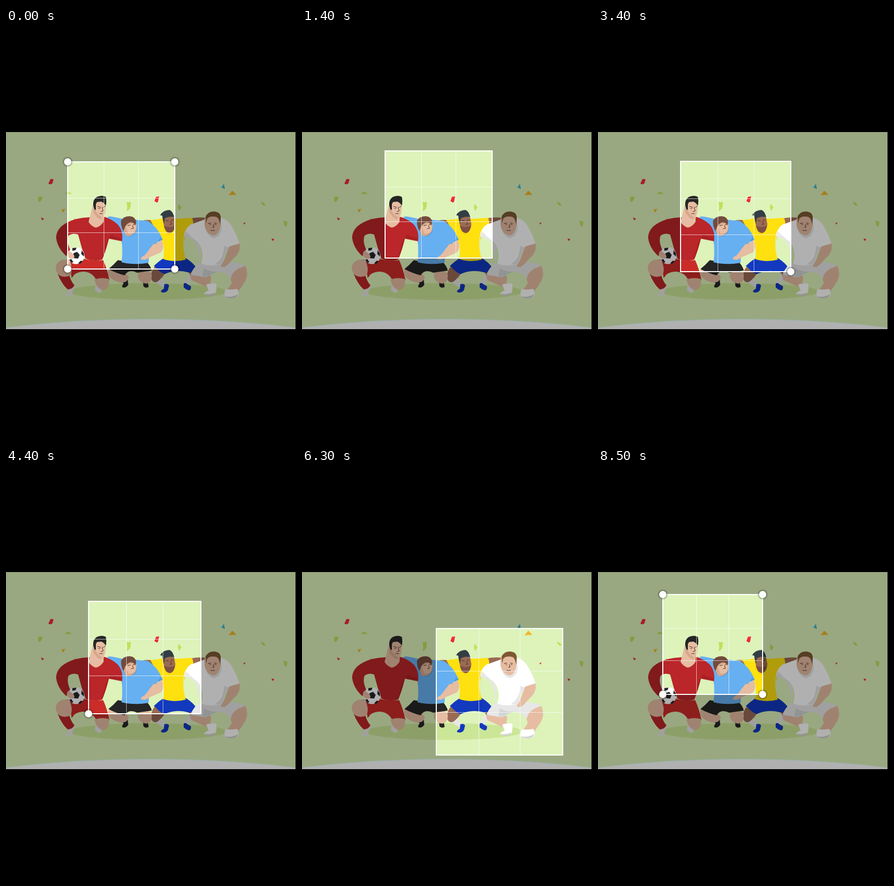
An HTML page without scripts that plays this animation: 555x788 px, repeating every 9.2 s.

```html
<!DOCTYPE html>
<html lang="en">
<head>
<meta charset="utf-8">
<title>Crop tool</title>
<style>
html, body { margin: 0; width: 100%; height: 100%; overflow: hidden; background: #000; }
.photo { position: absolute; left: 0; top: 199px; width: 554px; height: 377px; overflow: hidden; background: #ddf3ba; }
.photo svg { position: absolute; left: 0; top: 0; }

/* The oversized shadow dims everything outside the crop box. */
.crop {
  position: absolute; box-sizing: border-box; aspect-ratio: 1; margin: -1px;
  border: 2px solid #fff; box-shadow: 0 0 0 900px rgba(0, 0, 0, .31);
  animation: crop 9.2s infinite step-end;
}
.crop::before, .crop::after { content: ""; position: absolute; box-sizing: border-box; border: 0 solid rgba(255, 255, 255, .65); }
.crop::before { inset: 0 33.33%; border-width: 0 1px; }
.crop::after { inset: 33.33% 0; border-width: 1px 0; }

.crop i {
  position: absolute; z-index: 1; width: 14px; height: 14px; margin: -8px; border-radius: 50%;
  background: #fff; box-shadow: 0 0 3px 1px rgba(0, 0, 0, .55);
  animation: idle 9.2s infinite step-end;
}
.crop .tl { left: 0; top: 0; }
.crop .tr { right: 0; top: 0; }
.crop .bl { left: 0; bottom: 0; animation-name: drag-bl; }
.crop .br { right: 0; bottom: 0; animation-name: drag-br; }

@keyframes crop {
  0% { left: 118px; top: 57px; width: 207px; }
  7.6% { left: 115px; top: 105px; animation-timing-function: steps(2); }
  9.78% { left: 112px; top: 165px; animation-timing-function: steps(3); }
  13.04% { left: 70px; top: 3px; animation-timing-function: steps(2); }
  15.21% { left: 159px; top: 36px; width: 207px; }
  17.39% { left: 162px; top: 68px; }
  19.56% { left: 158px; top: 56px; width: 207px; }
  26.08% { left: 158px; top: 56px; width: 207px; animation-timing-function: steps(3); }
  29.34% { width: 149px; }
  30.43% { width: 143px; animation-timing-function: steps(4); }
  34.78% { width: 204px; animation-timing-function: steps(3); }
  38.04% { width: 218px; }
  40.21% { left: 158px; width: 217px; }
  47.82% { left: 158px; top: 56px; width: 217px; animation-timing-function: steps(2); }
  50% { left: 226px; width: 149px; }
  52.17% { left: 243px; width: 132px; }
  54.34% { left: 248px; width: 127px; }
  56.52% { left: 222px; width: 153px; animation-timing-function: steps(3); }
  59.78% { left: 130px; top: 56px; width: 244px; }
  63.04% { left: 138px; top: 66px; animation-timing-function: steps(3); }
  66.3% { left: 216px; top: 130px; }
  67.39% { left: 250px; top: 125px; }
  68.47% { left: 257px; top: 108px; }
  69.56% { left: 213px; top: 78px; animation-timing-function: steps(2); }
  71.73% { left: 128px; top: 10px; }
  72.82% { left: 124px; top: 43px; width: 244px; }
  88.04% { left: 124px; top: 43px; width: 244px; animation-timing-function: steps(3); }
  91.3% { width: 195px; }
  92.39%, 100% { left: 124px; top: 43px; width: 193px; }
}
@keyframes idle {
  0%, 19.56%, 40.21%, 59.78%, 72.82%, 80.43%, 92.39%, 100% { visibility: visible; }
  7.6%, 26.08%, 47.82%, 63.04%, 78.26%, 88.04% { visibility: hidden; }
}
@keyframes drag-br {
  0%, 19.56%, 59.78%, 72.82%, 100% { visibility: visible; }
  7.6%, 47.82%, 63.04% { visibility: hidden; }
}
@keyframes drag-bl {
  0%, 19.56%, 40.21%, 72.82%, 80.43%, 92.39%, 100% { visibility: visible; }
  7.6%, 26.08%, 63.04%, 78.26%, 88.04% { visibility: hidden; }
}

.skin { fill: #e6bda2; }
.tan { fill: #d7a78b; }
.brown { fill: #9a6a54; }
.red { fill: #ba262a; }
.red-lit { fill: #cb2c28; }
.red-dark { fill: #a52025; }
.blue { fill: #66b0f1; }
.blue-dark { fill: #559bdc; }
.yellow { fill: #ffe10f; }
.yellow-dark { fill: #eccb08; }
.navy { fill: #1239be; }
.black { fill: #252525; }
.white { fill: #fff; }
.gray { fill: #e7e7e8; }
.gray-dark { fill: #d3d4d6; }
.line { fill: none; stroke: #4a2c24; stroke-width: 1; stroke-linecap: round; }
.lime { fill: #bfe15b; }
.ruby { fill: #f3283a; }
.gold { fill: #f4b62a; }
</style>
</head>
<body>
<div class="photo">
<svg width="554" height="377" viewBox="0 199 554 377">
  <path class="white" stroke="#d0ffe0" d="M-2 573Q130 556.500 277 556.500T556 573V580H-2z"/>
  <ellipse cx="272" cy="504" rx="151" ry="16" fill="#cce697"/>

  <g id="confetti">
    <path class="ruby" d="M85 289l6 0-2 8-3 2-5-1zM67 362l6 3-4 3zM130 365l4 1-2 3zM287 323l6-1-2 10-2 2-5-3zM508 403h5l-2 5z M454 373l4-1-1 4z"/>
    <path class="lime" d="M62 323l8-1-2 7-3 4-4-3zM114 315q5-4 12 2l-11 1zM231 333l8 0-1 11-5 6-2-1 1-6zM330 336l6 7-5 7-2-7zM487 333q6-1 10 6l-4 1zM531 368l8 3-3 10-3-3z"/>
    <path class="gold" d="M106 347l8-1-5 7zM433 311l8 8-15 1z"/>
    <path fill="#40b9d3" d="M417 298l2 10-7-3z"/>
  </g>

  <g id="yellow-player">
    <path class="brown" d="M256 370q12-5 25-2v18q-11-11-25-12zM354 364q14-3 31-1v12l-27 7z"/>
    <path class="brown" d="M347 462l9 17q14 1 13-12l-6-10z"/>
    <path class="gray" d="M284 483l12-7q3 8 12 15l-5 6q-10-5-19-14zM341 487l9-15q5 2 5 8l-6 11z"/>
    <path class="navy" d="M303 490q8-2 9 3l-2 8q-4 7-13 4-2-3 5-6zM340 489q4-3 7 1l7 4q1 5-3 8-6-1-11-6z"/>
    <path class="navy" d="M302 440h42q13 8 20 18-5 9-13 10-26-8-48 3-13-6-20-16 8-8 19-15z"/>
    <path class="brown" d="M285 456q-9 10-7 24 4 9 12 5 9-7 13-14-11-5-18-15z"/>
    <path class="yellow" d="M276 367q11 0 25-3l25 1 30-2q4 10 1 14-16 9-17 24-3 18 4 42-22 6-43-1 4-32-7-45-8-12-18-30z"/>
    <path class="yellow-dark" d="M301 368q-1 19 7 25 13 3 18-26-3 24-14 28-10-3-11-27zM357 377q-14 7-15 32-3-23 15-32z"/>
    <path class="brown" d="M300 362q9-6 22 1l2 12q-1 16-11 17-8 0-10-12z"/>
    <path fill="#7d5144" d="M302 377q10 7 21 1-2 14-10 14-8-1-11-15z"/>
    <path fill="#333d43" d="M295 358q6-10 18-10 6 2 9 14-10-3-18 2l-2 11-2-9-1-7z"/>
    <path class="line" d="M306 368l5 1m5-1l4-1m-5 3l2 5-3 1"/>
  </g>

  <g id="blue-player">
    <path class="skin" d="M183 363q10-4 18 0l-5 13-12-3z"/>
    <path class="black" d="M222 483l11-2 1 10q-4 7-11 5-2-3 2-7zM262 482l9 2 2 11q-5 4-10-1z"/>
    <path class="skin" d="M200 460q21-2 35 16-2 11-14 11-20-4-24-14-4-9 3-13zM254 463q18-5 25 9 1 15-11 17-13-2-16-14z"/>
    <path class="black" d="M214 444q29 6 54 2 9 9 11 18l-28 4q-16-8-24 5-16-4-31-12 10-8 18-17z"/>
    <path class="blue" d="M198 360q13 2 25 5 28 2 48 4 19 11 29 36l-20 9q-7 5-7 35-28 5-52-1 3-21 0-42-13-9-26-31-9-3-10-5 6-5 13-10z"/>
    <path class="blue-dark" d="M222 382q3 15 14 17 14-1 16-20-4 16-15 17-9-2-15-14zM275 420q13-2 20-20l5 5-20 9z"/>
    <path class="skin" d="M281 414q10-2 17-9 6 14-1 24l-23 10q-9 7-16 3 0-4 7-7 7-8 16-21z"/>
    <path class="tan" d="M224 374q8-9 24-5 5 16-3 24-7 7-15 4-7-8-6-23z"/>
    <path class="skin" d="M229 379q9-6 19-5 3 11-3 17-6 3-11 2z"/>
    <path fill="#734b3c" d="M220 369q4-9 17-9 11 1 12 11l-1 6q-5-6-11-5-6 2-9 8l-3 8q-5-6-5-19z"/>
    <path class="line" d="M233 378l5-1m5-1l4 0m-5 2l2 5-4 1"/>
  </g>

  <g id="red-player">
    <path class="gray" d="M126 489q6 1 5 6l-6 17q-8 4-11-1l8-10zM171 492l11 3q3 8-1 11-7 1-11-5z"/>
    <path class="red" d="M99 470l21-3q2 15 11 25-3 7-13 8-12-11-19-30z"/>
    <path class="red-lit" d="M141 439q24 8 45 5 8 18 12 38l-24 2q-9-19-28-18-14 1-20 12-4-23-16-34z"/>
    <path class="red-lit" d="M116 445l34-4q-12 5-16 23l-8 14q-4-23-10-33z"/>
    <path class="skin" d="M96 453q9-14 25-9 8 16 3 29-13 6-22 0-9-8-6-20zM169 481q13-5 28-1 2 13-6 20-15 5-22-19z"/>
    <path class="red" d="M160 362q-27 1-43 10-21 11-21 29 2 19 19 35l9-9q-9-20-4-30 8-6 18-2 6 24 14 46 18 7 32 2 8-20 13-40l25 5q3-19-8-32-10-10-27-15z"/>
    <path class="red-dark" d="M184 443q5-32 17-47l21 7v3l-25-4q-7 28-13 41z"/>
    <path class="skin" d="M166 338q10-12 24-4 2 12-1 23-3 6-2 13-5 9-15 12-9-3-14-11z"/>
    <path class="tan" d="M166 349l4-4q2 10 12 16l3 1-4 4q-11-5-15-17z"/>
    <path class="black" d="M167 339q-1-11 7-16 10-4 17 0 2 8 0 17-3-6-9-8l-8 1-2 4 0 11-3-1z"/>
    <path class="line" d="M175 341l6 2m5 0l4-2m-13 4h3m4-2l2 7-4 1m-3 4h6"/>
    <circle class="white" cx="134" cy="435.500" r="16"/>
    <path class="black" d="M129 431l7-3 5 6-3 7-9-1zM127 421l8-1-2 5-6 1zM145 425l4 6v6l-5-5zM138 450l5-5 4 1-5 5zM121 443l4-1 4 6-4 1z"/>
    <path class="skin" d="M119 426q8 3 12 10 0 8-10 4-8-5-2-14z"/>
  </g>

  <g id="white-player">
    <path class="skin" d="M362 458l31 18-2 11 9 4-7 9-38-18q-6-8 7-24zM426 466l32-11q8 18-3 34l-14 20-19-5 10-16z"/>
    <path class="white" d="M383 491q8-4 19-2 2 9-1 19-11 5-22 1 1-4 9-7zM420 500q11 1 23-1 4 10 0 15-12 5-24 1-2-9 1-15z"/>
    <path class="gray-dark" d="M379 508q10 3 22-2-2 7-15 6zM419 513q14 3 25-4-1 8-14 8-9 0-11-4z"/>
    <path class="gray" d="M377 446l52 2q17 0 29 7-15 4-24 14l-4 10q-10-13-27-13-13 1-19 11l-31-5q8-20 24-26z"/>
    <path class="gray-dark" d="M379 459q8 10 42 6-24 0-36 12l-9-3z"/>
    <path class="white" d="M381 366l31-3q14 4 21 18 8 14 14 31-8 4-18 8-12 9-13 31-24 6-42 0 7-27-8-43-10-8-25-9 0-14 12-23 14-5 28-10z"/>
    <path class="gray" d="M341 399q1-5 4-10 7 9 21 19 11 14 2 43 4-24-7-42-8-8-20-10zM429 420q-13 9-13 31-9 2-17 1 19-11 18-36 6 4 12 4z"/>
    <path class="gray" d="M381 374q3 20 15 23 13-3 17-22 1 24-16 27-16-5-16-28z"/>
    <path class="skin" d="M427 418l20-6q2 17-9 26l-16 17q-8 5-11-1 6-6 10-19z"/>
    <path class="skin" d="M380 364q14-9 31 1v13q-4 18-15 19-13-4-16-19z"/>
    <path fill="#7d5832" d="M382 360q6-10 17-9 12 1 12 12l-1 13q-2-11-6-14-13-4-19 3l-2 9z"/>
    <path class="line" d="M387 374l5-1m7 0l4 1m-13 2h2m8 0h2m-5 0l1 5h-3m-3 6q4 1 7 0"/>
  </g>
</svg>
<div class="crop"><i class="tl"></i><i class="tr"></i><i class="bl"></i><i class="br"></i></div>
</div>
</body>
</html>
```
